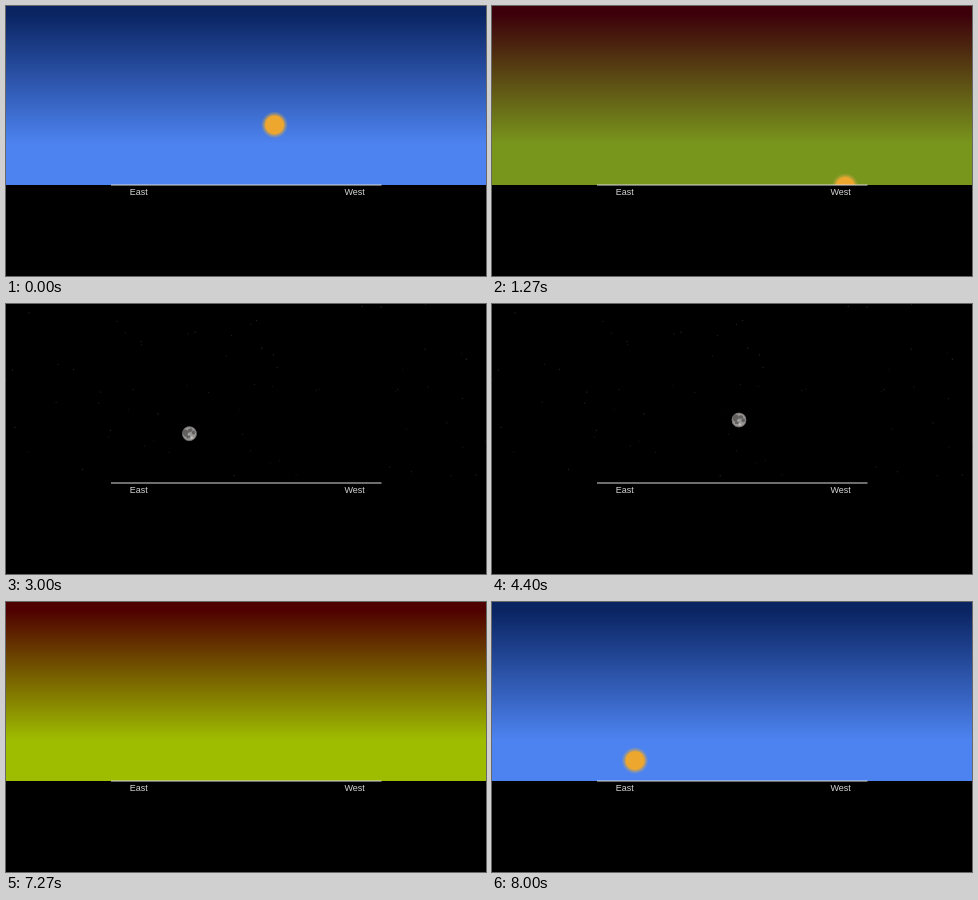
Write an HTML page that moves like this. It is 480 px wide and 270 px high and loops after 8.07 s.

```html
<!DOCTYPE html>
<html lang="en">
<head>
<meta charset="utf-8">
<title>Sun and moon</title>
<style>
  html, body { margin: 0; width: 100%; height: 100%; overflow: hidden; background: #000; }
  svg { display: block; width: 480px; height: 270px; }
  text { font: 9px "Liberation Sans", Arial, sans-serif; fill: #d4d4d4; }
</style>
</head>
<body>
<svg viewBox="0 0 480 270">
  <defs>
    <linearGradient id="sky" gradientUnits="userSpaceOnUse" x1="0" y1="8" x2="0" y2="138">
      <stop id="high"/>
      <stop id="low" offset="1"/>
    </linearGradient>
    <radialGradient id="glow">
      <stop offset=".66" stop-color="#eda62e"/>
      <stop offset=".76" stop-color="#e0a83c" stop-opacity=".6"/>
      <stop offset="1" stop-color="#c8a850" stop-opacity="0"/>
    </radialGradient>
    <clipPath id="disc"><circle r="7.5"/></clipPath>
  </defs>
  <rect width="480" height="180" fill="url(#sky)"/>
  <g id="stars" fill="#fff"></g>
  <g id="sun"><circle r="13.5" fill="url(#glow)"/></g>
  <g id="moon" clip-path="url(#disc)">
    <circle r="7.5" fill="#989594"/>
    <g fill="#625f5f">
      <ellipse cx="-3.2" cy="-1.8" rx="3" ry="3.6"/>
      <ellipse cx="1.8" cy="-3" rx="2.4" ry="1.8"/>
      <ellipse cx="4.2" cy=".2" rx="1.8" ry="2"/>
      <ellipse cx="-2.2" cy="2.8" rx="2" ry="1.3"/>
    </g>
    <circle cx="1" cy="4.5" r="1.2" fill="#c4c1c0"/>
    <circle cx="-1" cy=".2" r="1" fill="#b0adac"/>
    <circle r="7.2" fill="none" stroke="#504e4e" stroke-width=".8"/>
  </g>
  <rect y="179" width="480" height="91"/>
  <rect x="105" y="178.5" width="270.5" height="1" fill="#dcdcdc"/>
  <text x="123.7" y="188.5">East</text>
  <text x="338.5" y="188.5">West</text>
</svg>
<script>
const $ = id => document.getElementById(id);
const LOOP = 8070, STEP = 200 / 3;

const night = [0, 0, 0, 0, 0, 0];
const day = [10, 36, 98, 77, 131, 240];
const dusk = [100, 0, 18, 198, 245, 45];
const dawn = [80, 0, 0, 160, 190, 0];
// time, then the colours at the top and bottom of the sky
const skies = [
  [0, day], [600, day], [1000, dusk], [1100, dusk], [1530, night],
  [7000, night], [7270, dawn], [7350, dusk], [7450, dusk], [7870, day], [LOOP, day]
];

function skyAt(t) {
  const i = skies.findIndex(s => s[0] > t);
  const [t0, a] = skies[i - 1], [t1, b] = skies[i];
  return a.map((v, n) => v + (b[n] - v) * (t - t0) / (t1 - t0));
}

const rgb = c => `rgb(${c.map(Math.round)})`;
const ramp = (t, from, to) => Math.max(0, Math.min(1, (t - from) / (to - from)));

// angle is measured from the zenith, growing towards the west
function place(body, angle, radius, spin = 0) {
  const x = 241.5 + radius * Math.sin(angle), y = 245 - radius * Math.cos(angle);
  body.setAttribute("transform", `translate(${x} ${y}) rotate(${spin})`);
}

let seed = 11;
const random = () => (seed = seed * 16807 % 2147483647) / 2147483647;
for (let i = 0; i < 65; i++) {
  const star = document.createElementNS("http://www.w3.org/2000/svg", "circle");
  star.setAttribute("cx", random() * 480);
  star.setAttribute("cy", random() * 172);
  star.setAttribute("r", .6);
  star.setAttribute("opacity", .07 + random() * .13);
  $("stars").append(star);
}

function draw(now) {
  const t = Math.min(120, Math.floor((now % LOOP + 5) / STEP)) * STEP;

  const sky = skyAt(t);
  $("high").setAttribute("stop-color", rgb(sky.slice(0, 3)));
  $("low").setAttribute("stop-color", rgb(sky.slice(3)));
  $("stars").setAttribute("opacity", ramp(t, 1300, 1600) * ramp(t, 7100, 6800));

  const setting = t < 4000;
  place($("sun"), setting ? .211 + .00066 * t : -.85 + .00066 * (t - 8000), setting ? 129 : 131);
  $("sun").setAttribute("opacity", +(t < 1600 || t > 7400));

  const s = (t - 4400) / 1000;
  const angle = .0426 + .366 * s + .0016 * s * s;
  place($("moon"), angle, 129.1, angle * 40);
  $("moon").setAttribute("opacity", ramp(t, 1000, 1900) * ramp(t, 7270, 7000));
  requestAnimationFrame(() => draw(performance.now() - start));
}

const start = performance.now();
draw(0);
</script>
</body>
</html>
```
